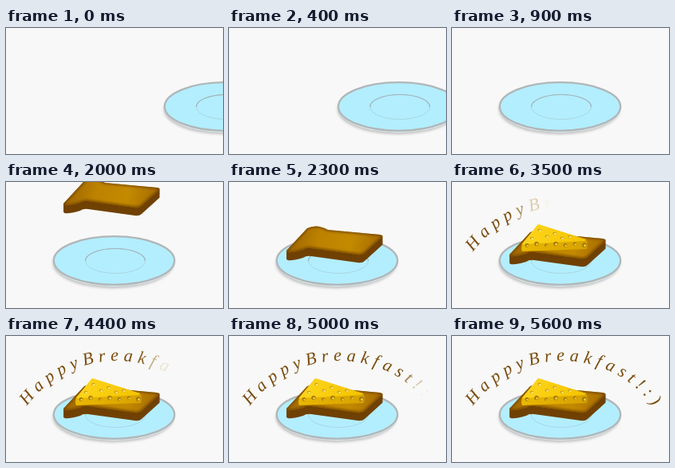
These frames come from a looping animation (272x158 px, 8700 ms). An HTML page with a canvas:

```html
<!DOCTYPE html>
<html lang="en">
<head>
<meta charset="utf-8">
<title>Happy Breakfast</title>
<style>
  html, body { margin: 0; width: 100%; height: 100%; overflow: hidden; background: #f8f8f8; }
  canvas { display: block; width: 272px; height: 158px; }
</style>
</head>
<body>
<canvas id="stage" width="272" height="158"></canvas>
<script>
const ctx = document.getElementById('stage').getContext('2d');
const LOOP = 8700, STEP = 100;
const GREETING = 'HappyBreakfast!:)';
const ARC = { x: 139, y: 172, radius: 141, start: -50 * Math.PI / 180, gap: 6.1 };
const SLICE = new Path2D('M72 86 L98 58 Q110 52 124 60 L189 66 Q195 67 191 70 L170 89 Q167 92 161 91 L103 83 Q97 82 93 85 Q72 91 72 86 Z');
const SLICE_DEPTH = 10;
const CHEESE_FRONT = new Path2D('M88 77 L108 53.5 L168 72 Q171 77 169 84 L88 87 Q86 84 88 77 Z');
const CHEESE_TOP = new Path2D('M88 78 L107 54 Q108 52.5 111 53.7 L168 72 L166 74 Z');
const clamp = v => Math.min(1, Math.max(0, v));

function ellipse(x, y, rx, ry, fill, stroke, width = 1, from = 0) {
  ctx.beginPath();
  ctx.ellipse(x, y, rx, ry, 0, from, Math.PI * 2);
  if (fill) { ctx.fillStyle = fill; ctx.fill(); }
  if (stroke) { ctx.strokeStyle = stroke; ctx.lineWidth = width; ctx.stroke(); }
}

function fill(path, style) {
  ctx.fillStyle = style;
  ctx.fill(path);
}

function gradient(x0, y0, x1, y1, ...colors) {
  const g = ctx.createLinearGradient(x0, y0, x1, y1);
  colors.forEach((c, i) => g.addColorStop(i / (colors.length - 1), c));
  return g;
}

function at(dx, dy, draw) {
  ctx.save();
  ctx.translate(dx, dy);
  draw();
  ctx.restore();
}

function plate() {
  ctx.save();
  ctx.filter = 'blur(1.5px)';
  ellipse(134.5, 102, 76, 31.5, '#c4c4c4');
  ctx.restore();
  ellipse(135.5, 99.5, 76.5, 31.5, '#dceff4');
  ellipse(135.5, 98.5, 75.7, 30.3, '#b3eefe', '#b1b6b8', 2.3);
  ellipse(137, 99, 37.5, 15.5, null, '#a5cbd6', 0.7);
  ellipse(137, 99, 37.5, 15.5, null, '#a2b4ba', 1.2, Math.PI);
}

function bread() {
  for (let depth = SLICE_DEPTH; depth > 0; depth--) {
    at(0, depth, () => fill(SLICE, '#704103'));
  }
  fill(SLICE, gradient(75, 60, 190, 88, '#9a6200', '#bd8200', '#c38a00', '#a46900'));
  ctx.save();
  ctx.clip(SLICE);
  ctx.filter = 'blur(1.5px)';
  ctx.strokeStyle = '#754600';
  ctx.lineWidth = 3;
  ctx.stroke(SLICE);
  ctx.restore();
}

function hole(x, y, rx, ry, shade, light) {
  ellipse(x, y, rx, ry, shade);
  ellipse(x + 0.6, y + 0.6, rx * 0.6, ry * 0.6, light);
}

function cheese() {
  fill(CHEESE_FRONT, gradient(88, 0, 170, 0, '#e9b800', '#d6a100'));
  fill(CHEESE_TOP, gradient(95, 56, 160, 80, '#fdd51c', '#f4c400'));
  for (let i = 0; i < 6; i++) {
    const x = 100 + i * 9.5;
    const edge = 54 + (x < 108 ? (108 - x) * 1.2 : (x - 108) * 0.3);
    const y = edge + (74 - edge) * (i % 2 ? 0.3 : 0.65);
    hole(x, y, 2.4, 1.6, '#cda010', '#ffed91');
  }
  for (let i = 0; i < 7; i++) {
    const r = 2.4 + 0.5 * Math.sin(i * 2.4);
    hole(94 + i * 12, 78.5 + Math.cos(i * 3), r, r, '#a0760a', '#edc52c');
  }
}

// Letters follow the arc by their own widths and darken from gold to brown.
function greeting(t) {
  ctx.font = 'italic 22px "Liberation Serif", serif';
  ctx.textAlign = 'center';
  let travelled = -ctx.measureText(GREETING[0]).width / 2;
  [...GREETING].forEach((letter, i) => {
    const width = ctx.measureText(letter).width;
    const angle = ARC.start + (travelled + width / 2) / ARC.radius;
    const shown = clamp((t - 2450 - i * 165) / 500);
    travelled += width + ARC.gap;
    ctx.save();
    ctx.globalAlpha = shown ** 1.4;
    ctx.fillStyle = `hsl(${46 - 11 * shown}, 82%, ${42 - 16 * shown}%)`;
    ctx.translate(ARC.x, ARC.y);
    ctx.rotate(angle);
    ctx.fillText(letter, 0, -ARC.radius);
    ctx.restore();
  });
}

function draw(t) {
  ctx.fillStyle = '#f8f8f8';
  ctx.fillRect(0, 0, 272, 158);
  at(139 * (1 - clamp(t / 900)), 0, plate);
  if (t >= 1800) at(0, Math.min(5, (t - 2300) * 0.197), bread);
  if (t >= 2300) at(0, Math.min(0, (t - 2790) * 0.2), cheese);
  greeting(t);
}

const start = performance.now();
function tick() {
  const t = (performance.now() - start) % LOOP;
  draw(Math.floor(t / STEP) * STEP);
  requestAnimationFrame(tick);
}
tick();
</script>
</body>
</html>
```
